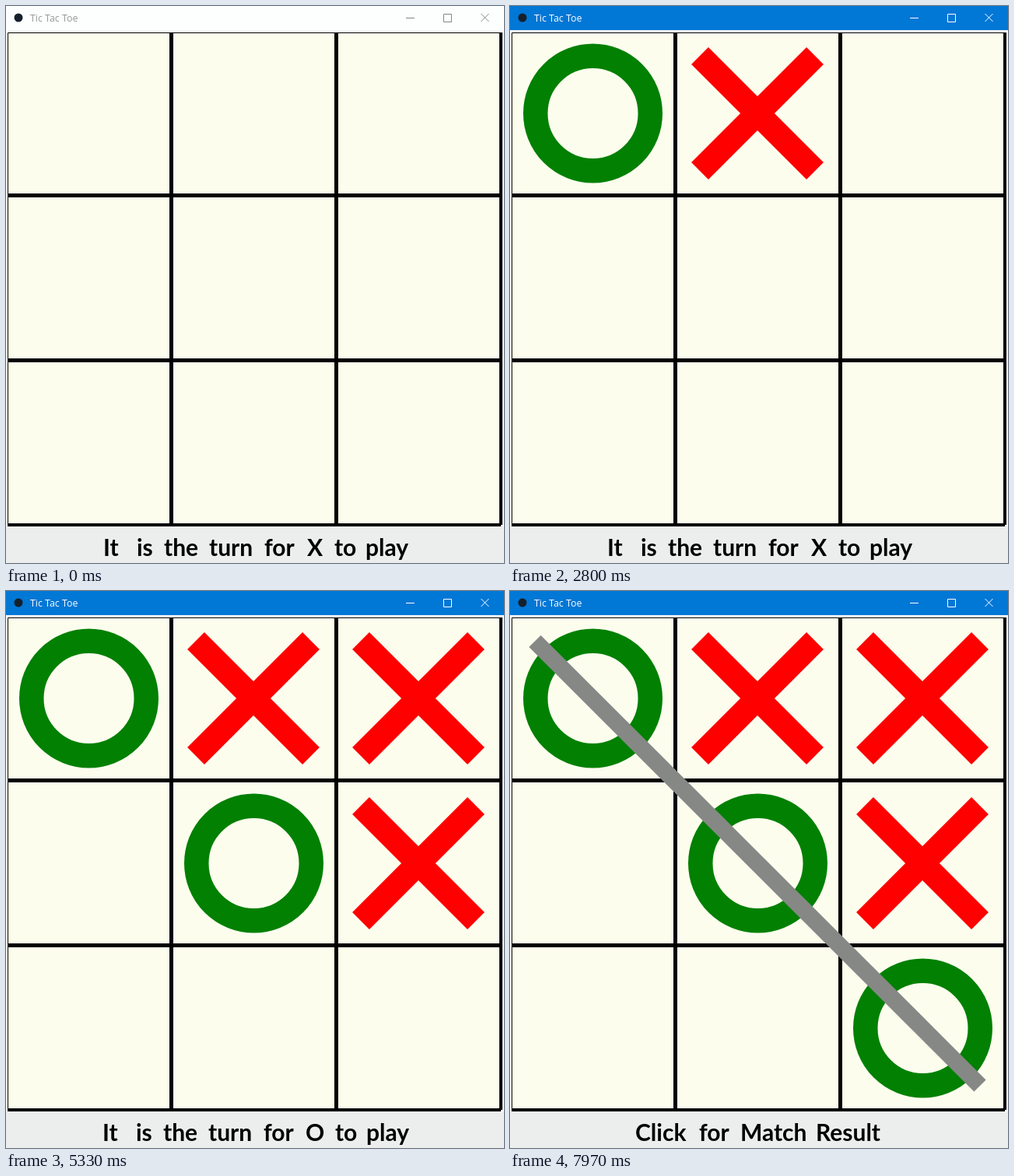
Write an HTML page that moves like this. It is 640 px wide and 716 px high and loops after 8 s.

```html
<!DOCTYPE html>
<html lang="en">
<head>
<meta charset="utf-8">
<title>Tic Tac Toe</title>
<style>
  html, body { margin: 0; width: 100%; height: 100%; overflow: hidden; background: #eceeed; }
  svg { display: block; width: 640px; height: 716px; }
  .title { font: 12.4px "Open Sans", sans-serif; }
  .status { font: 700 30px Lato, sans-serif; }
  .x { stroke: #fe0000; stroke-width: 31; }
  .o { stroke: #018001; stroke-width: 31.5; fill: none; }
  .strike { stroke: #858885; stroke-width: 21.5; }
</style>
</head>
<body>
<svg id="stage" viewBox="0 0 640 716">
  <rect width="640" height="716" fill="#eceeed"/>
  <rect y="31" width="640" height="638" fill="#fafbfa"/>
  <rect x="2" y="34" width="634" height="633" fill="#fdfdee"/>
  <g stroke="#000" fill="none">
    <path d="M2.5 667V34.5H636"/>
    <path stroke-width="5" d="M212.5 34V667M424.5 34V667M2 243.5H636M2 455.5H636"/>
    <path stroke-width="4" d="M636 34V667M2 667H636"/>
  </g>
</svg>
<script>
const LOOP = 8000;
const CELL = 212;
const stage = document.getElementById('stage');

// mark, column, row, time of the click
const moves = [
  ['x', 1, 0, 600],
  ['o', 0, 0, 2100],
  ['x', 2, 1, 3065],
  ['o', 1, 1, 3935],
  ['x', 2, 0, 4700],
  ['o', 2, 2, 6250]
];

function add(parent, tag, attrs, text = '') {
  const el = document.createElementNS('http://www.w3.org/2000/svg', tag);
  for (const name in attrs) el.setAttribute(name, attrs[name]);
  el.textContent = text;
  parent.append(el);
  return el;
}

// Hard on/off switch within the loop
function show(el, from, to = LOOP) {
  const step = (opacity, time) => ({ opacity, offset: time / LOOP, easing: 'steps(1, end)' });
  const frames = [step(from ? 0 : 1, 0)];
  if (from) frames.push(step(1, from));
  if (to < LOOP) frames.push(step(0, to));
  frames.push(step(to < LOOP ? 0 : 1, LOOP));
  el.animate(frames, { duration: LOOP, iterations: Infinity });
}

function titleBar(back, ink, buttons, from, to) {
  const bar = add(stage, 'g', {});
  add(bar, 'rect', { width: 640, height: 31, fill: back });
  add(bar, 'circle', { cx: 16, cy: 15, r: 5.5, fill: '#16202a' });
  add(bar, 'text', { class: 'title', x: 31, y: 20, fill: ink }, 'Tic Tac Toe');
  add(bar, 'path', {
    d: 'M514 15.5H525M562.5 10.5H572.5V20.5H562.5ZM610.5 10L620.5 20M620.5 10L610.5 20',
    stroke: buttons, fill: 'none'
  });
  show(bar, from, to);
}

function status(text, starts, from, to) {
  const line = add(stage, 'g', { class: 'status' });
  text.split(' ').forEach((word, i) => add(line, 'text', { x: starts[i], y: 707 }, word));
  show(line, from, to);
}

function mark([kind, col, row, time]) {
  const x = 106 + col * CELL, y = 138 + row * CELL;
  const el = kind === 'x'
    ? add(stage, 'path', { class: 'x', d: `M${x - 74} ${y - 74}l148 148m0-148l-148 148` })
    : add(stage, 'circle', { class: 'o', cx: x + 0.5, cy: y, r: 73.75 });
  show(el, time);
}

const first = moves[0][3], last = moves[moves.length - 1][3];
titleBar('#fdfefe', '#979797', '#858585', 0, first);
titleBar('#0177d6', '#fff', '#fff', first);

moves.forEach(mark);
show(add(stage, 'path', { class: 'strike', d: 'M32 64.5L604 636' }), last);

const turnX = [125, 168, 203, 261, 332, 387, 422, 462];
const turnO = [124, 167, 202, 260, 331, 385, 423, 463];
moves.forEach(([kind, , , time], i) => {
  const from = i ? moves[i - 1][3] : 0;
  status(`It is the turn for ${kind.toUpperCase()} to play`, kind === 'x' ? turnX : turnO, from, time);
});
status('Click for Match Result', [161, 243, 296, 393], last);
</script>
</body>
</html>
```
